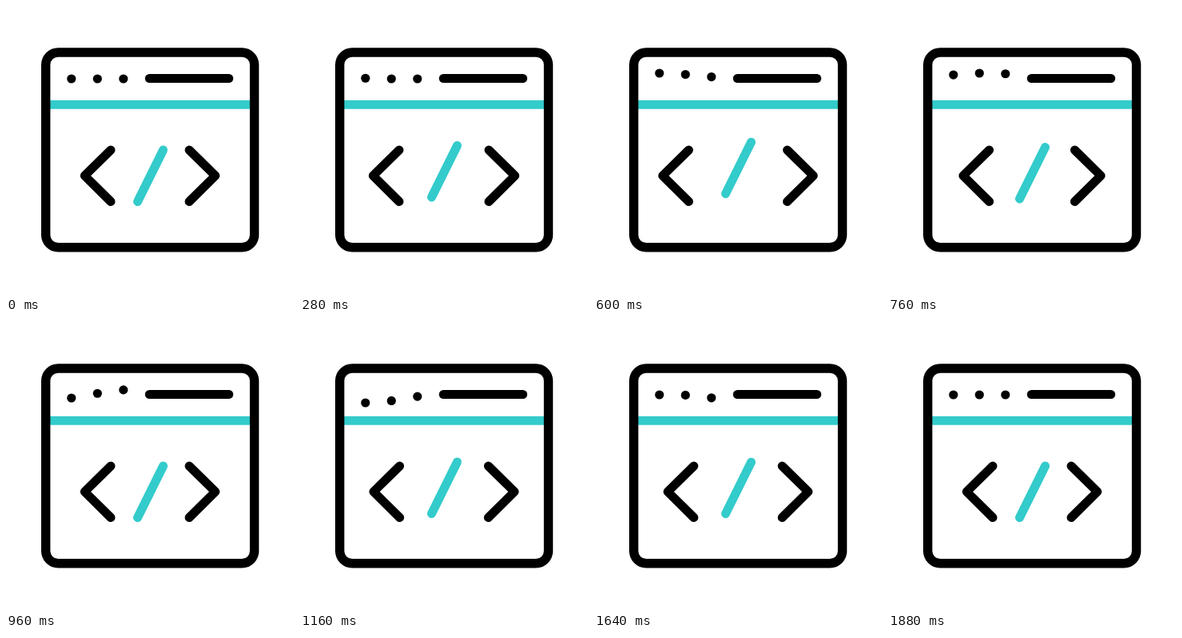
An HTML page that plays this animation: 360 px wide and 360 px high, repeating every 1.92 s.

```html
<!DOCTYPE html>
<html lang="en">
<head>
<meta charset="utf-8">
<title>Code window</title>
<style>
  html, body { margin: 0; width: 100%; height: 100%; overflow: hidden; background: #fff; }
  svg { display: block; width: 100%; height: 100%; }
  .line { fill: none; stroke: #000; stroke-width: 11; stroke-linecap: round; stroke-linejoin: round; }
  .teal { stroke: #33cbcb; }
  .flat { stroke-linecap: butt; }
</style>
</head>
<body>
<svg viewBox="0 0 360 360">
  <path class="line teal flat" d="M50 123.2H310"/>
  <rect class="line" x="49.7" y="58" width="260.8" height="243.7" rx="15.5" style="stroke-width:11.4"/>
  <path class="line" d="M179.3 90.5H278.6"/>
  <circle class="dot" cx="81.8" cy="91" r="5.6"/>
  <circle class="dot" cx="114.3" cy="91" r="5.6"/>
  <circle class="dot" cx="146.8" cy="91" r="5.6"/>
  <path id="left" class="line" d="M131 180L98.3 212.2L131 244.5"/>
  <path id="slash" class="line teal" d="M196.5 180L164.5 244.5"/>
  <path id="right" class="line" d="M229 180L261.7 212.2L229 244.5"/>
</svg>
<script>
  const LOOP = 1920, STEP = 40, DOT_LAG = 3;

  // Keys are [step, value] pairs, eased between neighbours.
  const spread = [[2, 0], [12, 1], [13.1, 1], [22.5, 0], [24.3, 0], [34.3, 1], [35.7, 1], [45.5, 0]];
  const bounce = [[5, 0], [15, -7], [16.2, -7], [29.2, 10], [39.2, 0]];

  const left = document.getElementById("left");
  const right = document.getElementById("right");
  const slash = document.getElementById("slash");
  const dots = document.querySelectorAll(".dot");

  const smooth = x => x * x * (3 - 2 * x);

  function sample(keys, t) {
    const next = keys.findIndex(key => key[0] > t);
    if (next === 0) return keys[0][1];
    if (next < 0) return keys[keys.length - 1][1];
    const [t0, v0] = keys[next - 1], [t1, v1] = keys[next];
    return v0 + (v1 - v0) * smooth((t - t0) / (t1 - t0));
  }

  const move = (el, x, y) => el.setAttribute("transform", `translate(${x} ${y})`);

  function draw(ms) {
    const step = Math.floor((ms % LOOP) / STEP);
    const open = sample(spread, step);
    move(left, -14 * open, 0);
    move(right, 14 * open, 0);
    move(slash, 0, -11 * open);
    dots.forEach((dot, i) => move(dot, 0, sample(bounce, step - i * DOT_LAG)));
  }

  const start = performance.now();
  function tick() {
    draw(performance.now() - start);
    requestAnimationFrame(tick);
  }
  tick();
</script>
</body>
</html>
```
